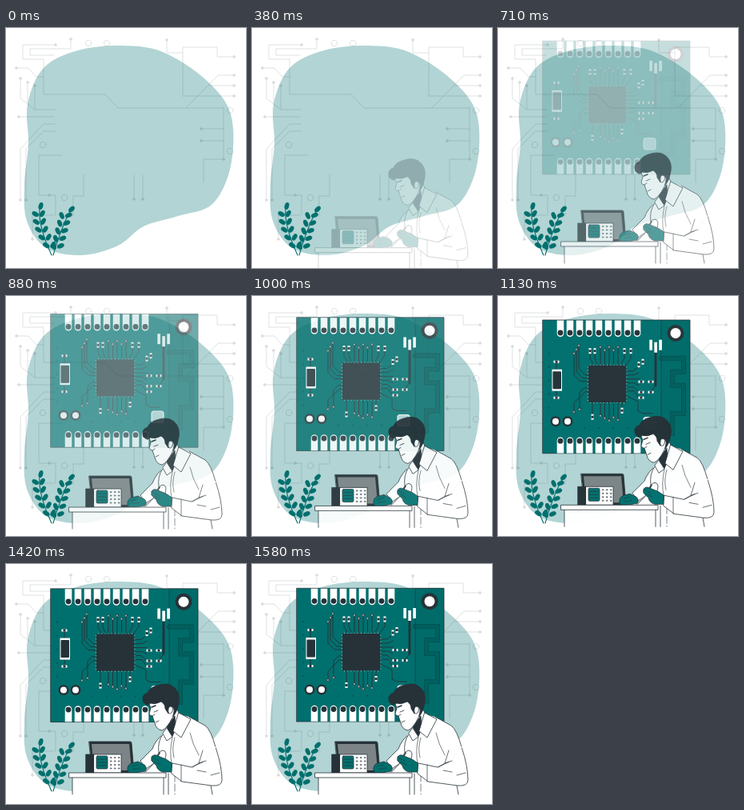
Animation, 300 px wide and 300 px high, one loop 1.62 s. Source, as an HTML page:

```html
<!DOCTYPE html>
<html lang="en">
<head>
<meta charset="utf-8">
<title>Electronics workbench</title>
<style>
html,body{margin:0;width:100%;height:100%;overflow:hidden;background:#fff}
svg{display:block;width:100vw;height:100vh}
</style>
</head>
<body>
<svg id="stage" viewBox="0 0 300 300" fill="none" stroke-linecap="round" stroke-linejoin="round">
  <path id="blob" fill="#b2d4d4"/>
  <g id="wires" stroke="#263238" stroke-width=".9" opacity=".16"></g>
  <g id="plant" fill="#00706e"></g>
  <g id="board"></g>
  <g id="scene" stroke="#263238" stroke-width=".8">
    <!-- laptop -->
    <path d="M104 222H155Q157 222 157 224L160 261H108Z" fill="#263238"/>
    <path d="M107 225H154L157 258H110Z" fill="#7c8487" stroke="none"/>
    <!-- table -->
    <path d="M83 267H203V288H83Z" fill="#fff" stroke="none"/>
    <path d="M83 267V288M197 267V288"/>
    <!-- meter -->
    <path d="M100 238H111V261H100Z" fill="#263238"/>
    <path d="M110 238H144V261H110Z" fill="#fff"/>
    <rect x="113" y="240" width="14" height="16" rx="1.5" fill="#00706e"/>
    <path d="M115 244H125M115 248H125M115 252H125" stroke-width=".7"/>
    <g id="knobs" stroke-width=".6"></g>
    <!-- far arm -->
    <path d="M196 213Q187 220 183 231L168 246L175 256L195 242Z" fill="#fff"/>
    <path d="M152 258Q151 251 157 249L165 247L173 251Q177 255 174 259L162 261H154Z" fill="#00706e"/>
    <path d="M157 253L165 251M158 257L167 255" stroke-width=".6"/>
    <!-- torso -->
    <path d="M205 200Q193 212 191 224Q189 237 196 247L205 252V288H258L256 278Q270 278 270 270Q270 255 262 229Q256 207 249 202L229 191L213 187Z" fill="#fff" stroke="none"/>
    <path d="M196 213Q189 222 191 236M229 191L249 202Q256 207 262 229M203 262V288M256 277L258 288"/>
    <path d="M211 263V288" stroke-width=".6" stroke-dasharray="9 3"/>
    <!-- neck and collar -->
    <path d="M201 200L213 180L218 190L208 215Z" fill="#fff"/>
    <path d="M201 203L211 190L212 206L208 215Q203 211 201 203Z" fill="#263238"/>
    <path d="M216 186L231 194L219 217L209 209Z" fill="#fff"/>
    <path d="M201 205L208 216L201 221L196 212Z" fill="#fff"/>
    <path d="M208 216Q204 235 207 249M211 217Q207 230 210 242" stroke-width=".6"/>
    <!-- face -->
    <path d="M178 172L181 180L179 187Q180 190 183 190L186 199Q188 207 195 208Q201 206 208 192L212 178L205 165H185Z" fill="#fff"/>
    <path d="M182 179L187 177" stroke-width="1.4"/>
    <path d="M185 185L190 183M187 198L191 196M183 190L186 188"/>
    <path d="M172 173Q168 164 177 161Q179 155 188 152Q202 147 210 154Q218 161 216 173Q215 183 209 191Q212 181 208 179Q204 179 203 187L199 181Q199 175 194 172Q187 176 180 174Q177 179 172 173Z" fill="#263238"/>
    <path d="M203 186Q202 178 206 178Q210 179 208 184Q206 189 203 186Z" fill="#fff"/>
    <!-- tabletop, tool, near arm -->
    <path d="M79 261H200V267H79Z" fill="#fff"/>
    <path d="M198 246Q203 234 196 233Q191 234 188 241"/>
    <path d="M192 236L185 249" stroke-width="1.5"/>
    <path d="M185 249L174 260" stroke="#7c8487" stroke-width="1.3"/>
    <path d="M182 241Q185 237 190 240L200 244L209 250L208 260L196 260Q189 258 188 252L182 246Z" fill="#00706e"/>
    <path d="M183 242L191 246M186 247L193 251" stroke-width=".6"/>
    <path d="M208 249L232 254L247 247L262 229Q270 253 270 270Q270 278 257 277L220 272L207 262Z" fill="#fff"/>
    <path d="M247 247L262 229" stroke="#fff" stroke-width="1.6"/>
    <path d="M219 251V272M246 233L241 249L250 246M241 249L233 254M267 261L256 264M239 258L250 260" stroke-width=".7"/>
    <path d="M230 211Q233 225 241 239" stroke-width=".6"/>
  </g>
</svg>
<script>
const LOOP = 1620, DARK = '#263238', TEAL = '#00706e', PALE = '#b2d4d4';
const $ = id => document.getElementById(id);
const path = (d, a = '') => `<path d="${d}" ${a}/>`;
const dot = (x, y, r, a = '') => `<circle cx="${x}" cy="${y}" r="${r}" ${a}/>`;
const rect = (x, y, w, h, a = '') => `<rect x="${x}" y="${y}" width="${w}" height="${h}" ${a}/>`;
const fill = c => `fill="${c}" `;
const line = (w, c = DARK) => `stroke="${c}" stroke-width="${w}" `;
const each = (n, f) => [...Array(n).keys()].map(f).join('');

// closed smooth curve through points
function smooth(pts) {
  const n = pts.length, at = i => pts[(i + n) % n];
  return `M${pts[0]}` + pts.map((p, i) => {
    const a = at(i - 1), c = at(i + 1), d = at(i + 2);
    return `C${p[0] + (c[0] - a[0]) / 6},${p[1] + (c[1] - a[1]) / 6} ` +
      `${c[0] - (d[0] - p[0]) / 6},${c[1] - (d[1] - p[1]) / 6} ${c}`;
  }).join('') + 'Z';
}

function drawBlob() {
  const key = '27,95 47,50 90,28 145,22 196,30 250,65 281,108 281,172 ' +
    '258,220 215,235 172,248 140,272 95,284 50,275 26,241 23,195 28,145';
  $('blob').setAttribute('d', smooth(key.split(' ').map(p => p.split(',').map(Number))));
}

function drawWires() {
  // each of these begins at a solder dot
  const ended = 'M62 21H21V39H47V83H124L140 100H272 M81 14V26H30V34H60 M13 50H28L38 61H47 ' +
    'M18 63V88L36 102H61 M27 68V95 M36 72V102 M16 111H60 M18 215V151L47 120H61 M25 215V151L47 129H61 ' +
    'M54 209H62V234 M33 264V234H60 M160 214V184 M171 214V184 M201 15V31H221 M285 36H264V24H221V85 ' +
    'M285 85H221 M285 59H265L225 100 M285 72H254 M244 126H272 M244 141H272 M272 164H247V193';
  const plain = 'M272 100V164M70 159H41V209H54M97 183V210H84V235';
  $('wires').innerHTML = path(ended + plain) +
    [...ended.matchAll(/M(\d+) (\d+)/g)].map(m => dot(m[1], m[2], 1.4, fill(DARK))).join('') +
    dot(103, 19, 3.7) + dot(126, 19, 3.7) + dot(46, 146, 3.7) + dot(73, 212, 3.7) +
    dot(280, 103, 3.7) + dot(280, 154, 3.7);
}

function drawPlant() {
  const leaf = (x, y, a) => `<ellipse rx="2.8" ry="4.6" transform="translate(${x} ${y}) rotate(${a})"/>`;
  const pair = (x, y, tilt) => leaf(x - 4.3, y + .5, tilt - 45) + leaf(x + 4.3, y, tilt + 45);
  $('plant').innerHTML =
    path('M57 284Q40 247 42 226M59 284Q68 252 80 229', 'fill="none"' + line(1.1, TEAL)) +
    leaf(43.5, 222.5, 15) + leaf(82, 226.5, 45) +
    each(5, k => pair(41 + .4 * k + .75 * k * k, 232 + 9.8 * k, -14) + pair(74 - 2.5 * k, 234 + 9.6 * k, 22));
}

function drawBoard() {
  const white = fill('#fff'), dark = fill(DARK), via = fill('#a9bbbc') + line(.7);
  const ring = (x, y, r) => dot(x, y, r, dark) + dot(x, y, r * .62, white);
  const part = (x, y, turn = 0) => `<g transform="translate(${x} ${y}) rotate(${turn})">` +
    rect(-3.5, -1.5, 7, 3, white) + rect(-1.5, -1.5, 3, 3, dark) + '</g>';
  const antenna = 'M204 78H232V95H218V112H232V147H218V172H204';

  let s = rect(56, 30.3, 184, 166.7, fill(TEAL)) + rect(204, 30.3, 36, 166.7, fill('#006b69')) +
    path(antenna, line(6, '#004f4e') + 'stroke-linejoin="miter"') +
    path(antenna, line(4.6, '#00605e') + 'stroke-linejoin="miter"') +
    path('M204 31V197', line(.6)) + rect(56, 30.3, 184, 166.7, line(.8));

  // edge pads
  s += each(9, i => {
    const x = 78 + i * 12, l = x - 4.3, r = x + 4.3;
    return path(`M${l} 30.7H${r}V47A4.3 4.3 0 0 1 ${l} 47Z`, white) + dot(x, 46.3, 3.4, dark) +
      path(`M${l} 196.7H${r}V181A4.3 4.3 0 0 0 ${l} 181Z`, white) + dot(x, 181.5, 3.4, dark);
  });
  s += ring(222, 46.7, 10.5) + ring(72, 157, 6.5) + ring(87, 157, 6.5);
  s += rect(182, 152, 15, 14, 'rx="3"' + fill(PALE) + line(1.2, '#fff'));

  // traces and vias
  s += each(3, i => {
    const x = 101 - 3 * i, y = 62 + 5 * i, bend = 91 + 4 * i;
    return path(`M${x} ${y}V${bend}l8 8H113`, line(1)) + dot(x, y, 1.5, via);
  });
  s += each(2, i => {
    const x = 102 - 7 * i, y = 142 + 3 * i;
    return path(`M${x} ${y}V${121 + 13 * i}L${108 + i} ${115 + 5 * i}H113`, line(1)) + dot(x, y, 1.5, via);
  });
  s += each(5, i => {
    const x = 128 + i * 5.5, top = 64 + i % 2 * 4, low = 150 + i * 3 % 7;
    return path(`M${x} ${top}V88M${x} 133V${low}`, line(1)) + dot(x, top, 1.5, via) + dot(x, low, 1.5, via);
  });
  s += each(6, i => {
    const y = 94 + 5 * i;
    return path(`M160 ${y}H${169 + i % 2}L176 ${88 + 8 * i}`, line(.9));
  });
  s += path('M160 125L175 132V144L181 147H193M73 83V128M118 133V150M155 133V142', line(.9));
  s += each(4, i => {
    const x = [115, 121, 158, 166][i];
    return path(`M${x} 70V78L${136.5 + (x - 136.5) * .75} 88`, line(.9)) + part(x, 69, 90);
  });
  s += each(5, i => dot(64, 72 + 17 * i, .9, fill('#004f4e')) + dot(108 + 18 * i, 165, .9, fill('#004f4e')));

  // connector
  s += path('M197 66V112', line(2.8)) + path('M197 112L191 120', line(1)) +
    each(3, i => rect(189.3 + 6 * i, 55 + i % 2 * 3, 3.6, 13, white));

  // chip and its pins
  s += each(11, i => {
    const k = 4.2 * i;
    return path(`M${115.5 + k} 86V134.300M112 ${89 + k}H161.300`, line(.9, PALE) + 'stroke-linecap="butt"');
  });
  s += rect(113, 87, 47.3, 46.3, 'rx="1"' + dark);

  // crystal and small parts
  s += rect(67.5, 92, 12.5, 27, white) + rect(68.5, 94.5, 10.5, 22, 'rx="1"' + dark);
  s += each(2, i => part(73, 82.5 + 45 * i) + part(179 + 12 * i, 107.5) + part(179 + 12 * i, 120.5) +
    part(176 + 5 * i, 86 - 3.5 * i, 90) + part(118 + 37 * i, 151.5 - 8 * i, 90));
  $('board').innerHTML = s + part(179, 127.5);
}

function bezier(x1, y1, x2, y2) {
  const f = (a, b, s) => 3 * (1 - s) ** 2 * s * a + 3 * (1 - s) * s * s * b + s ** 3;
  return x => {
    if (x <= 0) return 0;
    if (x >= 1) return 1;
    let lo = 0, hi = 1;
    for (let i = 0; i < 24; i++) {
      const m = (lo + hi) / 2;
      f(x1, x2, m) < x ? lo = m : hi = m;
    }
    return f(y1, y2, lo);
  };
}
const easeOut = bezier(0, 0, .58, 1), spring = bezier(.36, -.01, .5, 1.38);

function slide(id, p, from) {
  $(id).setAttribute('transform', `translate(0 ${from * (1 - p)})`);
  $(id).setAttribute('opacity', Math.max(0, Math.min(1, p)));
}
function render(t) {
  slide('scene', easeOut((t - 228) / 1000), 18);
  slide('board', spring((t - 468) / 1000), -18);
}

$('knobs').innerHTML = each(12, i => dot(131 + i % 3 * 5, 242 + Math.floor(i / 3) * 4.5, .8));
drawBlob();
drawWires();
drawPlant();
drawBoard();

const start = performance.now();
function tick() {
  render((performance.now() - start) % LOOP);
  requestAnimationFrame(tick);
}
tick();
</script>
</body>
</html>
```
